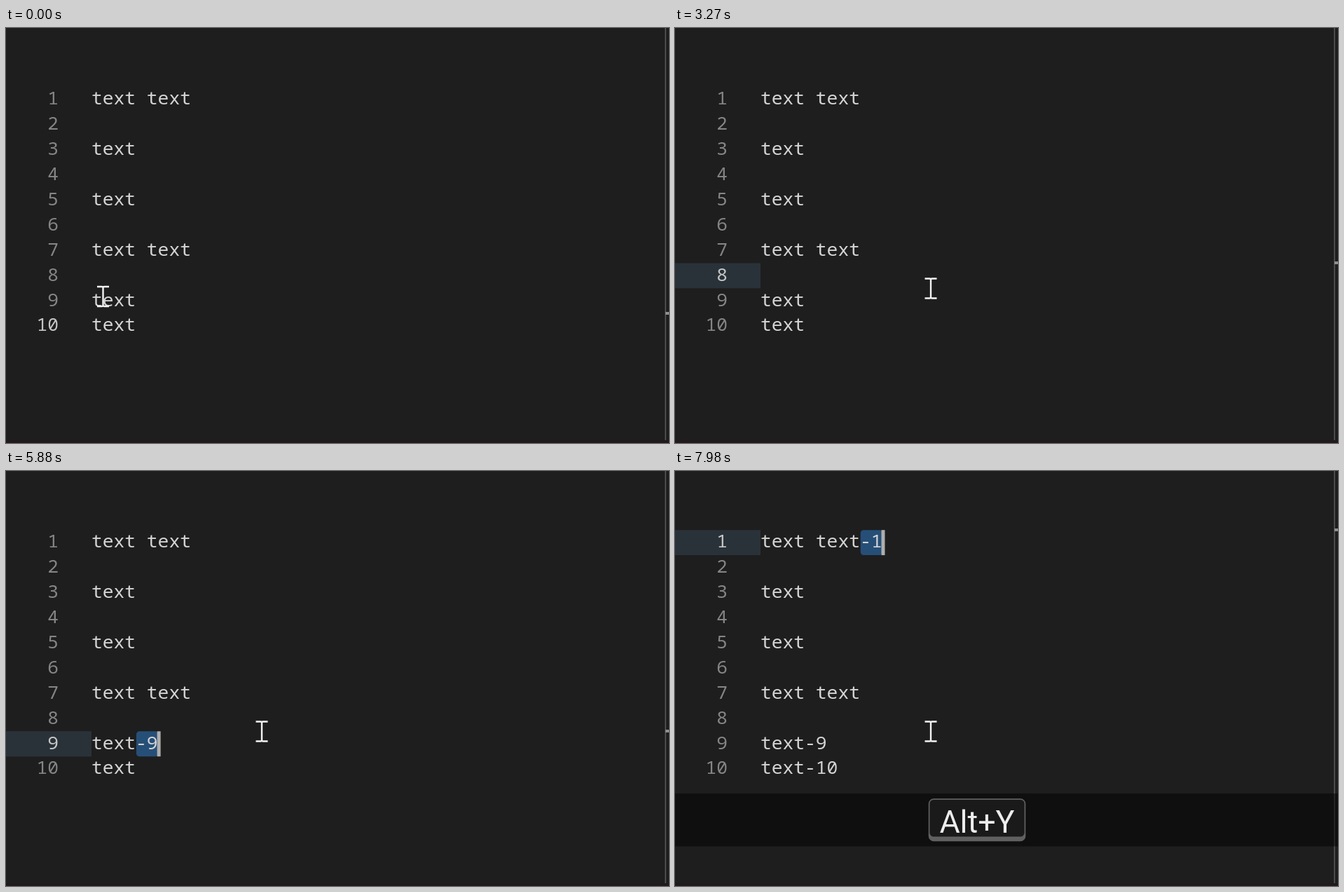
These frames come from a looping animation (946x592 px, 8000 ms). An HTML page with a canvas:

```html
<!DOCTYPE html>
<html lang="en">
<head>
<meta charset="utf-8">
<title>Numbered lines in an editor</title>
<style>
html, body { margin: 0; width: 100%; height: 100%; overflow: hidden; background: #1e1e1e; }
canvas { display: block; }
</style>
</head>
<body>
<canvas id="stage" width="946" height="592"></canvas>
<script>
const ctx = document.getElementById('stage').getContext('2d');
const LOOP = 8000, STEP = 70;
const LEFT = 122, CHAR = 15.77, TOP = 84.2, ROW = 35.89;
const LINES = ['text text', '', 'text', '', 'text', '', 'text text', '', 'text', 'text'];

// Each shortcut press appends "-<line>" to one line and selects it.
const EDITS = [
  { at: 3870, line: 9, hide: 4620 },
  { at: 6080, line: 10, hide: 6890 },
  { at: 7770, line: 1, hide: 8600 }
];
const CARET_ON = [[1740, 2310], [2810, 3270], [3800, 4420], [4890, 5420],
                  [5880, 6620], [7090, 7570], [7770, 8000]];

const clamp = v => Math.max(0, Math.min(1, v));
const rowTop = line => TOP + (line - 1) * ROW;

// Progress from 0 to 1 in equal jumps, the first one at the start time.
const stepped = (t, start, count) => clamp((Math.floor((t - start) / STEP) + 1) / count);

function rect(x, y, w, h, color, radius = 0) {
  ctx.fillStyle = color;
  ctx.beginPath();
  ctx.roundRect(x, y, w, h, radius);
  ctx.fill();
}

function mono(text, x, line, color) {
  ctx.font = '26.28px "Noto Sans Mono", monospace';
  ctx.fillStyle = color;
  const y = Math.round(rowTop(line) + 25.2);
  [...text].forEach((c, i) => ctx.fillText(c, x + i * CHAR, y));
}

function drawEditor(t) {
  const done = EDITS.filter(e => t >= e.at);
  const edit = done[done.length - 1];
  const clicked = t >= 1740;
  const active = edit ? edit.line : clicked ? 8 : 10;
  const top = rowTop(active);

  if (clicked) rect(0, top, LEFT, ROW, '#2a3239');
  let caretX = LEFT;
  if (edit) {
    const start = LEFT + LINES[active - 1].length * CHAR;
    const width = (1 + String(active).length) * CHAR;
    rect(start + 0.8, top, width, ROW, '#264f78', 4.5);
    caretX = start + width - 1;
  }

  LINES.forEach((text, i) => {
    const line = i + 1, label = String(line);
    mono(label, 75 - label.length * CHAR, line, line === active ? '#c6c6c6' : '#858585');
    const suffix = done.some(e => e.line === line) ? '-' + line : '';
    mono(text + suffix, LEFT, line, '#d4d4d4');
  });

  if (CARET_ON.some(([a, b]) => t >= a && t < b)) rect(caretX, top, 5, ROW, '#aeafad');

  rect(940, 0, 2, 588, '#4b4b4b');
  rect(941, Math.round(top) - 2, 5, 4, '#8f8f8f');
  rect(0, 588, 946, 4, '#21191d');
}

function drawPointer(t) {
  const up = stepped(t, 1200, 5);
  const across = stepped(t, 1950, 5);
  const ease = across * across * (3 - 2 * across);
  ctx.save();
  ctx.translate(138.5 - 4.5 * up + 231 * ease, 383 - 31 * up + 19.5 * ease);
  ctx.strokeStyle = '#f4f4f4';
  ctx.lineWidth = 2.4;
  ctx.beginPath();
  for (const side of [-1, 1]) {
    ctx.moveTo(8.5 * side, -14);
    ctx.lineTo(1.8 * side, -14);
    ctx.quadraticCurveTo(0, -14, 0, -12.5);
    ctx.lineTo(0, 12.5);
    ctx.quadraticCurveTo(0, 14, 1.8 * side, 14);
    ctx.lineTo(8.5 * side, 14);
  }
  ctx.stroke();
  ctx.restore();
}

function drawClick(t) {
  if (t < 1740 || t >= 1880) return;
  const scale = t < 1810 ? 1 : 0.8;
  ctx.strokeStyle = '#f00000';
  ctx.lineWidth = 4 * scale;
  ctx.beginPath();
  ctx.arc(134.5, 353.5, 24.4 * scale, 0, 7);
  ctx.stroke();
}

function drawKeys(t) {
  const press = EDITS.find(e => t >= e.at && t < e.hide);
  if (!press) return;
  ctx.globalAlpha = stepped(t, press.at, 4);
  rect(0, 460, 946, 75.5, 'rgba(0,0,0,.5)');

  // The rim and the face do not overlap, so the key fades evenly.
  rect(363.5, 469, 135, 52.5, '#1a1a1a', 5.5);
  ctx.fillStyle = '#606060';
  ctx.beginPath();
  ctx.roundRect(361.7, 467.2, 138.6, 61, 7.5);
  ctx.roundRect(363.5, 469, 135, 52.5, 5.5);
  ctx.fill('evenodd');

  ctx.font = '44.8px Roboto, sans-serif';
  ctx.fillStyle = '#ededed';
  ctx.fillText('Alt+Y', 377.4, 516);
  ctx.globalAlpha = 1;
}

function frame(now) {
  const t = now % LOOP;
  rect(0, 0, 946, 592, '#1e1e1e');
  drawEditor(t);
  drawClick(t);
  drawPointer(t);
  drawKeys(t);
  requestAnimationFrame(frame);
}
requestAnimationFrame(frame);
</script>
</body>
</html>
```
